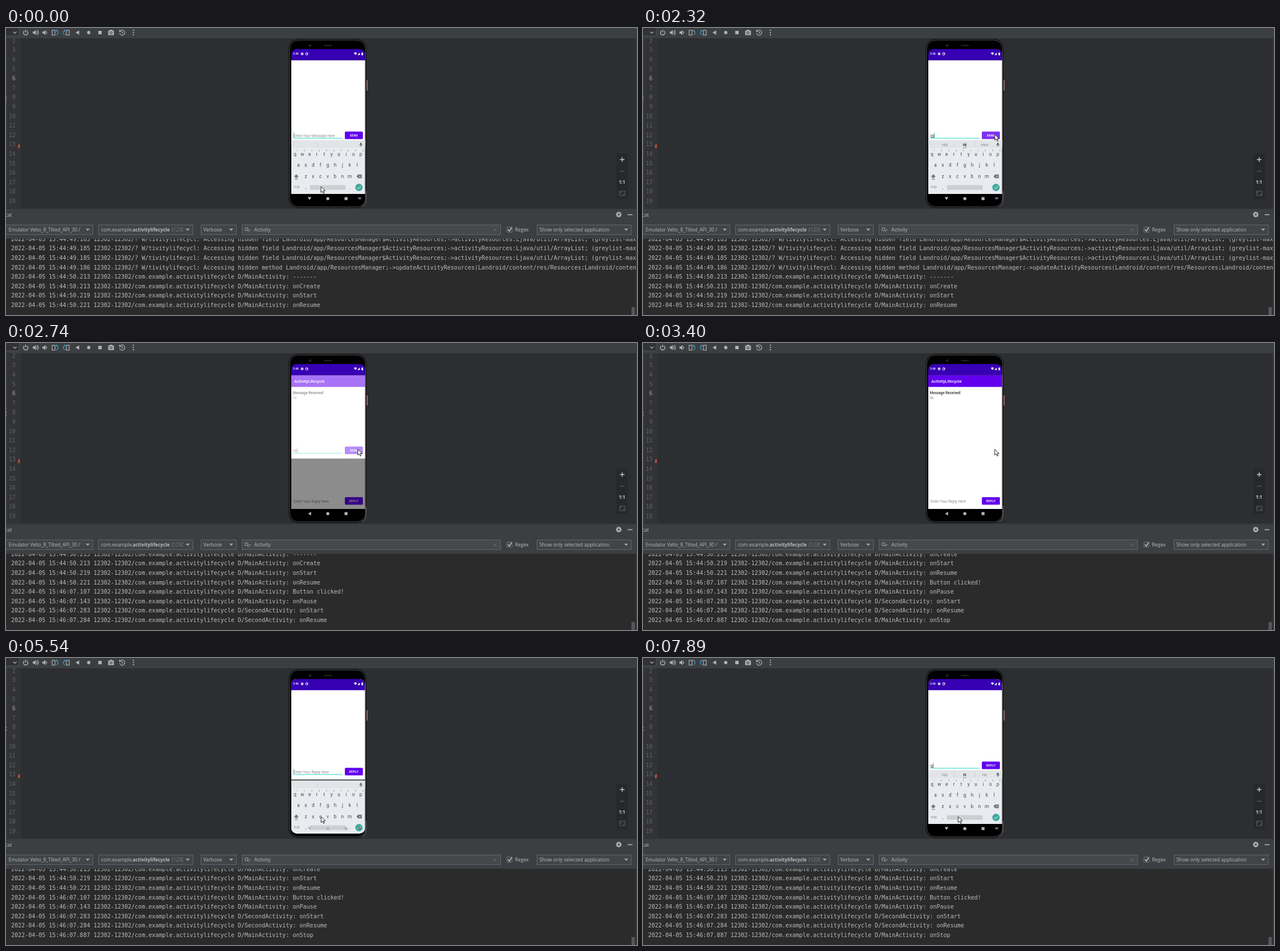
Recreate the animation shown at these times as an HTML page. Size 1108 px wide and 505 px high, loop 8000 ms.

```html
<!DOCTYPE html>
<html lang="en">
<head>
<meta charset="utf-8">
<title>Activity lifecycle</title>
<style>
html, body { margin: 0; width: 100%; height: 100%; overflow: hidden; background: #2b2b2b; }
svg { display: block; width: 100%; height: 100%; }
text { white-space: pre; }
.ui { font-family: "Open Sans", "Noto Sans", sans-serif; font-size: 8.6px; fill: #bbb; }
.mono { font-family: "DejaVu Sans Mono", monospace; font-size: 10.02px; fill: #bbb; }
.app { font-family: Roboto, sans-serif; }
</style>
</head>
<body>
<svg id="stage" viewBox="0 0 1108 505" xmlns="http://www.w3.org/2000/svg"></svg>
<script>
const LOOP = 8000;
const ROW = 16.55;
const SCREEN = { x: 500.7, w: 130 };
const stage = document.getElementById('stage');

const rect = (x, y, w, h, fill, more = '') =>
  `<rect x="${x}" y="${y}" width="${w}" height="${h}" fill="${fill}" ${more}/>`;
const circle = (x, y, r, fill, more = '') =>
  `<circle cx="${x}" cy="${y}" r="${r}" fill="${fill}" ${more}/>`;
const path = (d, fill, more = '') => `<path d="${d}" fill="${fill}" ${more}/>`;
const line = (d, color = '#afb1b3', width = 1.2) =>
  path(d, 'none', `stroke="${color}" stroke-width="${width}"`);
const text = (x, y, s, cls, more = '') => `<text x="${x}" y="${y}" class="${cls}" ${more}>${s}</text>`;
const appText = (x, y, s, size, fill, more = '') =>
  text(x, y, s, 'app', `font-size="${size}" fill="${fill}" ${more}`);
const band = (y, h, fill) => rect(SCREEN.x, y, SCREEN.w, h, fill);
const mid = 'text-anchor="middle"';

function toolbar() {
  const g = '#afb1b3', blue = '#3592c4';
  const speaker = x => path(`M${x} 6.2h2.2l3-2.7v9l-3-2.7h-2.2z`, g);
  const rotate = (x, dir) => `<g transform="translate(${x} 8) scale(${dir} 1)">` +
    rect(-5, -4, 5, 8.5, 'none', `stroke="${g}" stroke-width="1.2"`) +
    line('M2 -3.5q4 1 3.4 4.2q-.3 2.6-3.2 3.4', blue, 1.3) + path('M1 -3.4l3-2.3v4.4z', blue) + '</g>';
  return rect(0, 0, 1108, 18, '#3c3f41') +
    rect(-8, -4, 31, 18, '#303234', 'stroke="#515456"') +
    line('M12.5 6.5l3 3 3-3') +
    line('M32.3 5a4 4 0 1 0 4.5 0M34.5 3v5', g, 1.4) +
    speaker(47) + line('M53.5 5.5q2 2.5 0 5M55 3.5q4 4.5 0 9') +
    speaker(64) + line('M70.5 5.5q2 2.5 0 5') +
    rotate(86, 1) + rotate(106, -1) +
    path('M122 8l6.5-3.7v7.4z', g) + circle(145.3, 8, 2.9, g) + rect(162, 5, 6, 6, g) +
    path('M179.5 4.5h2.4l1-1.5h3.2l1 1.5h2.4v8h-10z', g) + circle(184.5, 8.3, 2.4, '#3c3f41') + circle(184.5, 8.3, 1.2, g) +
    line('M200.2 5.5a4.6 4.6 0 1 1-.7 3.4M199.3 3v3.2h3.2M204 5.4v3l2 1.2') +
    [4, 8, 12].map(y => circle(223.7, y, 1.15, g)).join('');
}

function editor() {
  let s = rect(0, 18, 1108, 300, '#2d2e31') + rect(0, 18, 26, 300, '#313335') +
    rect(0, 18, 1.5, 300, '#3c3f41') + rect(1106.5, 0, 1.5, 318, '#3c3f41');
  for (let n = 2; n < 20; n++) {
    s += text(16.8, 25.8 + (n - 2) * 16.6, n, 'mono', `text-anchor="end" style="fill:${n === 6 ? '#a4a3a3' : '#606366'}"`);
  }
  s += path('M21 211v-4l2-3.5 1.3 2v5.5z', '#b9503f');
  s += rect(0, 121, 1, 2, '#999') + rect(0, 126, 1, 2, '#999');
  s += rect(1072, 221, 20, 80, '#27282a', 'rx="2"') +
    line('M1078 231.5h8M1082 227.5v8', '#c4c6c8', 1.4) + line('M1078 252h8', '#5d6062') +
    text(1081.6, 274, '1:1', 'ui', `${mid} style="font-weight:700;font-size:8px;fill:#c8c8c8"`) +
    rect(1077.5, 287, 9.5, 8, 'none', 'stroke="#5d6062"') +
    line('M1079.5 291v-2h2M1085 291v2h-2', '#5d6062', 1);
  return s;
}

function panel() {
  const box = (x, w, arrow) => rect(x, 346.5, w, 17, arrow ? '#414547' : '#45494a', 'stroke="#626567"') +
    (arrow ? path(`M${x + w - 12.5} 353h7l-3.5 4z`, '#a0a3a5') : '');
  const gear = Array.from({ length: 8 }, (_, i) =>
    rect(1074.9, 323.2, 2.2, 3, '#afb1b3', `transform="rotate(${i * 45} 1076 328.2)"`)).join('');
  return rect(0, 318, 1108, 53, '#3c3f41') + rect(0, 317.5, 1108, 1, '#323437') +
    text(-1.5, 331.5, 'cat', 'ui') +
    gear + circle(1076, 328.2, 2.7, 'none', 'stroke="#afb1b3" stroke-width="2"') +
    line('M1091.5 328.5h8.5', '#afb1b3', 1.6) +
    box(-3, 155.5, true) + '<g clip-path="url(#device)">' +
    text(4.8, 358.2, 'Emulator Velto_8_Tilted_API_30 /', 'ui', 'style="font-size:8.3px"') + '</g>' +
    box(162.5, 165.5, true) + text(167, 358.2, 'com.example.', 'ui') +
    text(222.6, 358.2, 'activitylifecycle', 'ui', 'style="font-weight:700;font-size:8.3px"') +
    '<g clip-path="url(#pid)">' + text(291, 358.2, '(12302)', 'ui', 'style="fill:#7d7f80"') + '</g>' +
    box(342.5, 62, true) + text(346.5, 358.2, 'Verbose', 'ui') +
    box(414.5, 454, false) + circle(422.3, 354, 2.7, 'none', 'stroke="#afb1b3"') +
    line('M424.3 356l2.6 2.8M426.5 354.5l1.5 1.5 1.5-1.5', '#afb1b3', 1) +
    text(436, 358.2, 'Activity', 'ui') + line('M856 352.5l5 5M861 352.5l-5 5', '#6e7173', 1) +
    rect(879.5, 350, 9.5, 9.5, '#43494a', 'rx="1" stroke="#6b6b6b"') + line('M881.5 354.5l2.3 3 4.2-6.5', '#c0c0c0', 1.5) +
    text(893.8, 358.2, 'Regex', 'ui') + box(932.5, 165.5, true) +
    text(936.8, 358.2, 'Show only selected application', 'ui');
}

function logLines() {
  const field = '49.185 12302-12302/? W/tivitylifecycl: Accessing hidden field Landroid/app/ResourcesManager$ActivityResources;->activityResources:Ljava/util/ArrayList; (greylist-max-o';
  const entry = (when, msg, name = 'Main') => `${when} 12302-12302/com.example.activitylifecycle D/${name}Activity: ${msg}`;
  return [
    field, field, field,
    '49.186 12302-12302/? W/tivitylifecycl: Accessing hidden method Landroid/app/ResourcesManager;->updateActivityResources(Landroid/content/res/Resources;Landroid/content',
    entry('50.213', '-------'), entry('50.213', 'onCreate'), entry('50.219', 'onStart'), entry('50.221', 'onResume'),
    entry('07.107', 'Button clicked!'), entry('07.143', 'onPause'),
    entry('07.283', 'onStart', 'Second'), entry('07.284', 'onResume', 'Second'), entry('07.887', 'onStop')
  ].map((s, i) => text(9, 374.9 + i * ROW, `2022-04-05 15:${i < 8 ? 44 : 46}:${s}`, 'mono')).join('');
}

function inputRow(id, hint, label) {
  return appText(505, 191.5, hint, 6.45, '#8c8c8c', `id="${id}Hint"`) +
    appText(505, 191.5, '', 6.45, '#333', `id="${id}Text"`) +
    rect(505, 192.2, 5, .8, '#444', `id="${id}Compose"`) +
    rect(505, 184.3, 1, 9, '#2cb5a6', `id="${id}Caret"`) +
    rect(505, 193.5, 86, 1, '#1fd6c4', `id="${id}Line"`) +
    rect(595, 182.2, 31.7, 13.2, '#6200ee', `rx="1.5" id="${id}Button"`) +
    appText(611, 190.7, label, 5, '#fff', `${mid} font-weight="700" letter-spacing=".45"`);
}

function keyboard() {
  const ink = '#43474b';
  const row = (keys, x, y, step) => [...keys].map((k, i) =>
    appText(x + i * step, y, k, 8.2, ink, mid)).join('');
  const digits = [...'1234567890'].map((k, i) => appText(511.3 + i * 12.83, 217.4, k, 3.6, '#666', mid)).join('');
  const slots = [530, 565, 600].map((x, i) =>
    appText(x, 207.6, '', 6.8, i === 1 ? '#333' : '#85898d', `${mid} id="slot${i}" ${i === 1 ? 'font-weight="700"' : ''}`)).join('');
  return band(197.5, 94.5, '#e8ebef') + band(197.5, 13.5, '#e1e5e8') +
    rect(546.3, 200, .8, 9.5, '#c9cdd0') + slots +
    '<g id="picked">' + rect(582.8, 200, .8, 9.5, '#c9cdd0') + rect(562, 210.3, 6, 1, '#8a8d90') + '</g>' +
    rect(621.9, 201.7, 2.4, 4.4, '#55595d', 'rx="1.2"') + line('M620.7 204.6q.2 2.7 2.4 2.7t2.4-2.7M623.1 207v1.6', '#55595d', .8) +
    digits + row('qwertyuiop', 507.5, 224.6, 12.83) + row('asdfghjkl', 513.6, 243.8, 12.88) + row('zxcvbnm', 526.5, 263.6, 12.85) +
    path('M509.8 257.3l4.4 4.4h-2.4v2.5h-4v-2.5h-2.4z', '#777b7f') + rect(507, 266, 5.6, 1, '#777b7f') +
    path('M615.6 261l2.7-3.3h6.3v6.6h-6.3z', '#6a6e72') + line('M619.5 259.3l3.3 3.4M622.8 259.3l-3.3 3.4', '#e8ebef', .8) +
    appText(510.3, 282.4, '?123', 5, '#666a6e', mid) + appText(526.5, 283, ',', 8, ink, mid) +
    rect(533.8, 276.4, 62.5, 8.3, '#ccd0d3', 'rx="1"') + appText(603.7, 283, '.', 8, ink, mid) +
    circle(619.8, 280.5, 6.5, '#41aa9f') + line('M616.8 280.7l2.1 2.1 4-4.2', '#fff', 1);
}

function phone() {
  const nav = '#b4b6b8', small = '#76797b';
  const status = band(37, 19.6, '#3700b3') + appText(504, 47.4, '3:46', 5, '#fff', 'font-weight="500"') +
    rect(518, 43.6, 4, 4, '#fff', 'rx=".6"') + rect(519.3, 44.8, 1.4, 1.6, '#3700b3') +
    circle(528, 45.6, 2.1, 'none', 'stroke="#fff" stroke-width=".9"') + path('M528 45.6v-2.2a2.2 2.2 0 0 1 2.2 2.2z', '#fff') +
    path('M610.8 44q2.8-2 5.6 0l-2.8 3.6z', '#fff') + path('M617 47.6l4.2-4.4v4.4z', '#fff') +
    rect(624.2, 43.3, 2.8, 4.6, '#fff', 'rx=".5"');
  const second = band(56.6, 235.4, '#fff') + band(56.6, 20.7, '#6200ee') +
    appText(506.3, 70.1, 'ActivityLifecycle', 7.25, '#fff', 'font-weight="500"') +
    appText(503.7, 90, 'Message Received', 6.35, '#484848', 'font-weight="700"') +
    appText(503.9, 98.8, 'Hi', 6.3, '#777') +
    '<g transform="translate(0 89)">' + inputRow('reply', 'Enter Your Reply Here', 'REPLY') + '</g>';
  return rect(633.2, 92, 1.8, 18, '#a3706a') +
    rect(496.5, 19.6, 136.3, 296.8, '#000', 'rx="17"') +
    rect(498, 21.1, 133.4, 293.8, 'none', 'rx="15.5" stroke="#5f6164" stroke-width=".9"') +
    line('M632.2 287v15q0 9-7 12', '#8a8c8e', .8) +
    circle(534, 30.8, 2.6, '#17191c') + circle(534, 30.8, 1, '#2b3038') + rect(558, 29.7, 14.5, 2, '#242526', 'rx="1"') +
    '<g clip-path="url(#screen)">' +
    '<g id="main">' + band(56.6, 146.7, '#fff') + inputRow('send', 'Enter Your Message Here', 'SEND') + '</g>' +
    `<g id="second">${second}</g><g id="keys">${keyboard()}</g>${status}</g>` +
    path('M529.8 297.5h6.4l-3.2 5.3z', nav, 'id="back"') +
    circle(565.1, 300.2, 2.7, nav) + rect(594.5, 297.6, 5.2, 5.2, nav) +
    '<g id="kbIcon">' + rect(618.2, 298.2, 5.6, 2.5, small, 'rx=".5"') + path('M619.8 301.4h2.6l-1.3 1.3z', small) + '</g>';
}

const clip = (id, x, y, w, h, r = 0) => `<clipPath id="${id}">${rect(x, y, w, h, '#000', `rx="${r}"`)}</clipPath>`;
stage.innerHTML = '<defs>' + clip('screen', SCREEN.x, 37, SCREEN.w, 272, 10) + clip('log', 0, 371, 1106, 125) +
  clip('device', 0, 346, 136, 18) + clip('pid', 290, 346, 21.5, 18) + '</defs>' +
  rect(0, 0, 1108, 505, '#2b2b2b') + editor() + toolbar() + panel() +
  `<g clip-path="url(#log)"><g id="lines">${logLines()}</g></g>` +
  rect(1106.5, 371, 1.5, 134, '#3c3f41') + rect(1098.3, 491, 6, 14, '#55585a') + phone() +
  path('M0 0v10.3l2.5-2.2 1.7 3.9 1.8-.8-1.7-3.8h3.2z', '#fff', 'id="mouse" stroke="#111" stroke-width=".9"');

const el = Object.fromEntries([...stage.querySelectorAll('[id]')].map(n => [n.id, n]));
const show = (node, on) => node.setAttribute('display', on ? 'inline' : 'none');
const move = (node, x, y) => node.setAttribute('transform', `translate(${x} ${y})`);

const held = (steps, t) => steps.reduce((cur, s) => t >= s[0] ? s : cur).slice(1);

const MOUSE = [[0, 553, 279], [1190, 595, 238], [1340, 628, 204], [1490, 637, 190], [1630, 630, 188],
  [1750, 623, 187], [1870, 617.7, 187], [3520, 611, 197], [3670, 588, 245], [3800, 568, 279], [3940, 562, 297],
  [4070, 558, 302], [4220, 557, 296], [4340, 557, 288], [4490, 558, 284.5], [4610, 555, 281], [4730, 553.3, 279]];
const TYPED = [[0, ''], [530, 'H'], [1190, 'Hi'], [3010, ''], [6330, 'H'], [6760, 'Hi'], [7190, 'H'], [7340, ''], [7740, 'H']];
const ONE = 'His,H,He', TWO = 'His,Hi,Him';
const SUGGEST = [[0, ''], [650, ONE], [1190, TWO], [2610, ''], [6610, ONE], [6910, TWO], [7340, ''], [7890, ONE]];
const CARET = [[0, 1], [1630, 0], [2160, 1], [3010, 0], [5130, 1]];
const LAST_LINE = [[0, 7], [2450, 9], [2610, 10], [2740, 11], [3400, 12]];
const FADE = [[0, 0], [2740, .55], [2880, .95], [3010, 1]];
const SLIDE = [[0, 89, 0], [5420, 48, 60], [5540, 11, 18], [5670, 3, 5], [5790, 1, 1], [5920, 0, 0]];
const BUTTON = [[0, '#6200ee'], [2160, '#7020ef'], [2320, '#7c30f0'], [2450, '#7020ef'], [2610, '#6200ee']];

function updateInput(id, typed, composing, caret, focused) {
  const width = [0, 4.7, 6.3][typed.length];
  el[id + 'Text'].textContent = typed;
  show(el[id + 'Hint'], !typed);
  show(el[id + 'Compose'], composing);
  el[id + 'Compose'].setAttribute('width', width);
  show(el[id + 'Caret'], caret);
  el[id + 'Caret'].setAttribute('x', 504.8 + width);
  show(el[id + 'Line'], focused);
}

function render(t) {
  const [typed] = held(TYPED, t), [words] = held(SUGGEST, t), [caret] = held(CARET, t);
  const [fade] = held(FADE, t), [pan, drop] = held(SLIDE, t);
  const keysUp = t < 2610 || t >= 5420, replying = t >= 5130;

  move(el.mouse, ...held(MOUSE, t));
  move(el.lines, 0, (7 - held(LAST_LINE, t)[0]) * ROW);

  show(el.main, fade < 1);
  updateInput('send', typed, words !== '', caret, true);
  el.sendButton.setAttribute('fill', held(BUTTON, t)[0]);

  show(el.second, fade > 0);
  el.second.setAttribute('opacity', fade);
  move(el.second, 0, pan - 89);
  updateInput('reply', replying ? typed : '', replying && words !== '', replying && caret, replying);

  show(el.keys, keysUp);
  move(el.keys, 0, drop);
  const slots = words ? words.split(',') : ['', '', ''];
  slots.forEach((w, i) => { el['slot' + i].textContent = w; });
  show(el.picked, words !== '');

  const down = t < 2740 || t >= 5420;
  el.back.setAttribute('transform', down ? '' : 'rotate(90 533 300.2)');
  show(el.kbIcon, down);
}

function tick() {
  render(performance.now() % LOOP);
  requestAnimationFrame(tick);
}
tick();
</script>
</body>
</html>
```
